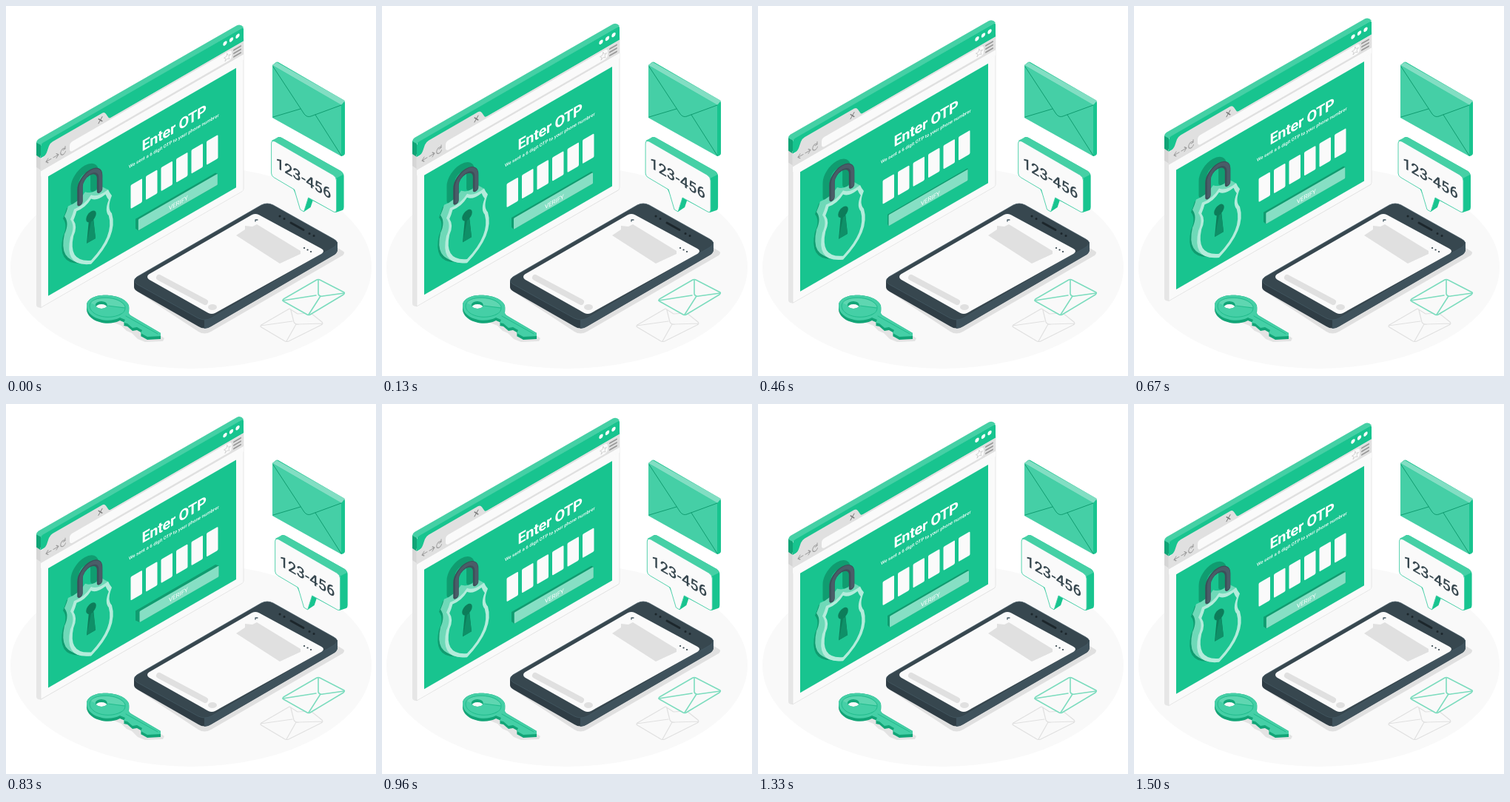
Animation, 500 px wide and 500 px high, one loop 1540 ms. Source, as an HTML page:

```html
<!DOCTYPE html>
<html lang="en">
<head>
<meta charset="utf-8">
<title>Enter OTP</title>
<style>
  html, body { margin: 0; height: 100%; overflow: hidden; background: #fff; }
  svg { display: block; width: 100vw; height: 100vh; }
  text { font-family: Roboto, sans-serif; fill: #fff; }
  .line { fill: none; stroke-linecap: round; stroke-linejoin: round; }
</style>
</head>
<body>
<svg viewBox="0 0 500 500">
  <defs>
    <path id="shield" d="M115 322Q106 331 92 328Q90 334 87 339Q94 352 87 363Q78 398 115 415.500Q152 398 143 363Q136 352 143 339Q140 334 138 328Q124 331 115 322Z"/>
    <path id="shackle" class="line" d="M100 324V304A13.300 13.300 0 0 1 126.600 304V322"/>
  </defs>

  <ellipse cx="250" cy="353" rx="244" ry="137" fill="#f9f9f9"/>

  <!-- Browser window -->
  <g id="window">
    <path d="M41 204L47 207V408Q41 408 41 404Z" fill="#e6e6e6"/>
    <path d="M41 184L47 187V222L41 218Z" fill="#d5d5d5"/>
    <path d="M41 184L47 187V206L41 202Z" fill="#10a476"/>
    <path d="M41 185Q41 182 44 180L312 26.500Q317 24 321 29L47 188Z" fill="#45d0a5"/>
    <g transform="matrix(1 -.577 0 1 0 0)">
      <path d="M47 230H321V433Q321 435 319 435H47Z" fill="#fafafa" stroke="#e0e0e0" stroke-width=".8"/>
      <path d="M47 233V217Q47 214 50 214H319Q321 214 321 217V233Z" fill="#18c48f"/>
      <path d="M47 251V234Q53 234 55 230L58 223Q60 220 63 220H130Q133 220 135 224L138 230Q139 233 142 233H321V251Z" fill="#e0e0e0"/>
      <rect x="86" y="235" width="219" height="13" rx="4" fill="#fafafa"/>
      <path d="M47 251H321V258H47Z" fill="#fafafa"/>
      <g fill="#fff">
        <circle cx="296" cy="221.500" r="2.700"/><circle cx="304.500" cy="221.500" r="2.700"/><circle cx="313" cy="221.500" r="2.700"/>
      </g>
      <path class="line" stroke="#999" d="M54 242H61M57 239L54 242L57 245M64 242H71M68 239L71 242L68 245M80 239A3.500 4 0 1 0 80.500 243M80 236V239.500H77"/>
      <path class="line" stroke="#777" stroke-width="1.100" d="M125 225L130 231M130 225L125 231"/>
      <path class="line" stroke="#999" stroke-width="2" d="M308 237.500H317M308 242H317M308 246.500H317"/>
      <path class="line" stroke="#ccc" stroke-width=".7" d="M299 237L300.300 240.300L303.500 240.500L301 242.800L302 246L299 244L296 246L297 242.800L294.500 240.500L297.700 240.300Z"/>
      <rect x="57" y="263.500" width="254" height="161.500" fill="#18c48f"/>
      <text x="183.500" y="303" font-size="20" font-weight="700" letter-spacing="-.4">Enter OTP</text>
      <text x="166" y="315.500" font-size="6.100" font-weight="500">We sent a 6 digit OTP to your phone numbrer</text>
      <g id="boxes" fill="#fafafa"></g>
      <path id="buttonSide" fill="#109c70"/>
      <rect id="buttonFace" x="179" y="392" width="107" height="15" rx="1" fill="#86dfc4"/>
      <text x="220" y="403.500" font-size="8">VERIFY</text>

      <!-- Padlock -->
      <use href="#shackle" x="-7" y="-8" stroke="#109c70" stroke-width="11"/>
      <use href="#shield" x="-10" y="-7" fill="#109c70"/>
      <g id="shieldSide" fill="#6fd9b8"></g>
      <use href="#shield" fill="#b3ecdb"/>
      <use href="#shield" fill="#1ec592" transform="translate(115 369) scale(.85 .89) translate(-115 -369)"/>
      <g fill="#0d7d5a">
        <circle cx="115" cy="351" r="6.800"/><path d="M112 354H118L121 384H109Z"/>
      </g>
      <path d="M115 358L118 358L121 384L109 384Z" fill="#0f9068"/>
      <use href="#shackle" stroke="#3d4f59" stroke-width="7.500"/>
      <use href="#shackle" x="1" stroke="#4a5d68" stroke-width="4.500"/>
    </g>
  </g>

  <!-- Large envelope -->
  <path d="M360 80L365 76Q366 75 368 76L456 127Q458 128 458 131V199Q458 202 453 203Z" fill="#18c48f"/>
  <path d="M360 80L366 76L458 128L453 134Z" fill="#82dec3"/>
  <path d="M360 80L453 133.500V203L360 151Z" fill="#45cfa6"/>
  <path class="line" stroke="#109c70" d="M361 82L403 146Q407 151 412 149L453 134M361 150L398 139M418 147L453 202"/>

  <!-- Code bubble -->
  <g id="bubble">
    <path d="M359 184L367 178Q369 176 373 178L453 223Q457 226 457 230V272Q457 275 455 276L446 279L415 263L412 272L403 278Z" fill="#18c48f"/>
    <path d="M359 182L367 178Q369 176 373 178L453 223Q456 225 456 228L446 233Z" fill="#45d0a5"/>
    <path d="M359 186Q359 181 364 183L442 228Q447 231 447 236V275Q447 280 443 278L409 259L403 278L398 275L390 248L363 232Q359 230 359 226Z" fill="#fafafa" stroke="#45cfa6" stroke-width=".9"/>
    <text transform="matrix(1 .577 0 1 0 0)" x="365" y="7.500" font-size="20" font-weight="500" style="fill:#37474f">123-456</text>
  </g>

  <!-- Phone -->
  <path d="M173 383L260 440Q268 445 277 440L455 337Q459 333 455 331L440 322Z" fill="#e0e0e0"/>
  <path d="M173 371V380Q173 383 178 386L260 433Q268 438 277 433L444 336Q448 333 448 329V319Z" fill="#2f3d45"/>
  <path d="M268 424V436Q273 436 277 433L444 336Q448 333 448 329V319Z" fill="#3f525c"/>
  <path d="M177 366L345 269Q353 265 361 269L443 315Q452 320 443 326L277 422Q269 426 260 422L177 376Q170 371 177 366Z" fill="#37474f" stroke="#455a64" stroke-width=".8"/>
  <path d="M194 363L333 283Q337 281 341 283L426 329Q430 331 426 334L282 414Q278 416 274 414L194 369Q190 366 194 363Z" fill="#fafafa" stroke="#fafafa" stroke-width="2"/>
  <path d="M311 310L323 302V297L333 298L339 295L398 331V335L370 348Z" fill="#e0e0e0"/>
  <path class="line" stroke="#e0e0e0" stroke-width="8" d="M207 367L269 400"/>
  <ellipse cx="279" cy="407" rx="6" ry="4" fill="#e0e0e0"/>
  <path class="line" stroke="#455a64" stroke-width="1.300" d="M340 289H337V291"/>
  <path class="line" stroke="#37474f" stroke-width="2.200" d="M403 327h.1M407.500 329.500h.1M412 332h.1"/>
  <path class="line" stroke="#1c262b" stroke-width="3" d="M385 293L402 302.500M370 284h.1M376 287.500h.1M410 307.500h.1M416 310.500h.1"/>

  <!-- Key -->
  <path d="M108 412Q116 430 146 428L156 432L163 439L170 442L178 450L188 454L212 453L214 449L166 416Z" fill="#e3e3e3"/>
  <g fill="#12a577">
    <path id="keyShape" fill-rule="evenodd" d="M109 405C109 385 160 387 166 405C167 411 164 414 168 418L209 442V446L191 447L182 442L184 438L177 434L171 435L164 429L159 428L161 424L154 421C137 430 109 422 109 405ZM121 404A8 5 0 1 0 137 404A8 5 0 1 0 121 404Z"/>
    <use href="#keyShape" y="2"/><use href="#keyShape" y="4"/>
    <use href="#keyShape" fill="#45cfa6"/>
  </g>
  <path d="M114 401C120 391 155 392 161 407L137 405Q137 399 129 399Q122 399 120 404Z" fill="#5fd6b1"/>
  <path class="line" stroke="#18b786" stroke-width=".8" d="M154 417C137 425 113 418 113 405C114 390 155 391 161 406Q162 414 154 417M138 405L160 408M162 419L205 443"/>

  <!-- Outlined envelopes -->
  <g class="line">
    <path stroke="#e0e0e0" stroke-width="1.200" d="M345 431L383 409L394 416L412 415L427 427Q429 429 426 431L382 453Q380 454 377 453L345 434Q343 433 345 431ZM385 411L389 427Q391 431 396 430L428 429M344 432L387 426M379 453L392 430"/>
    <path stroke="#7cdcbe" stroke-width="1.600" fill="#f9f9f9" d="M375 396L420 370Q422 369 424 370L457 387Q458 388 456 390L411 417Q409 418 407 417L375 399Q373 398 375 396Z"/>
    <path stroke="#7cdcbe" stroke-width="1.600" d="M422 370L422 389Q423 393 428 392L457 388M374 398L419 391M409 417L425 392"/>
  </g>
</svg>
<script>
const $ = id => document.getElementById(id);
const LOOP = 1540, CYCLE = 1.5, FPS = 24, SLOPE = 0.577;
const SHAKE = [0, -1, 2, -4, 4, -4, 4, -4, 2.4, -1, 0];

for (let i = 0; i < 6; i++)
  $('boxes').innerHTML += `<rect x="${168.5 + i * 20.5}" y="339.5" width="15.5" height="32" rx="1.5"/>`;
for (let i = 8; i > 0; i--)
  $('shieldSide').innerHTML += `<use href="#shield" x="${-i}" y="${-i * 1.1}"/>`;

function shakeAt(p) {
  const i = Math.floor(p * 10), k = p * 10 - i;
  return SHAKE[i] + (SHAKE[i + 1] - SHAKE[i]) * k;
}

function draw(ms) {
  // The motion advances in steps of 1/24 s
  const step = Math.floor((ms % LOOP + 5) * FPS / 1000);
  const p = (step + 0.5) / FPS / CYCLE % 1;
  const rise = 10 * (1 - Math.abs(2 * p - 1));
  const dx = shakeAt(p), dy = dx * SLOPE;

  $('window').setAttribute('transform', `translate(0 ${-rise})`);
  $('bubble').setAttribute('transform', `translate(${3 * dx} 0)`);
  $('buttonFace').setAttribute('transform', `translate(${dx} ${dy})`);
  $('buttonSide').setAttribute('d',
    `M175 389H283L${286 + dx} ${392 + dy}V${407 + dy}H${179 + dx}L175 402Z`);
}

const start = performance.now();
(function tick() {
  draw(performance.now() - start);
  requestAnimationFrame(tick);
})();
</script>
</body>
</html>
```
